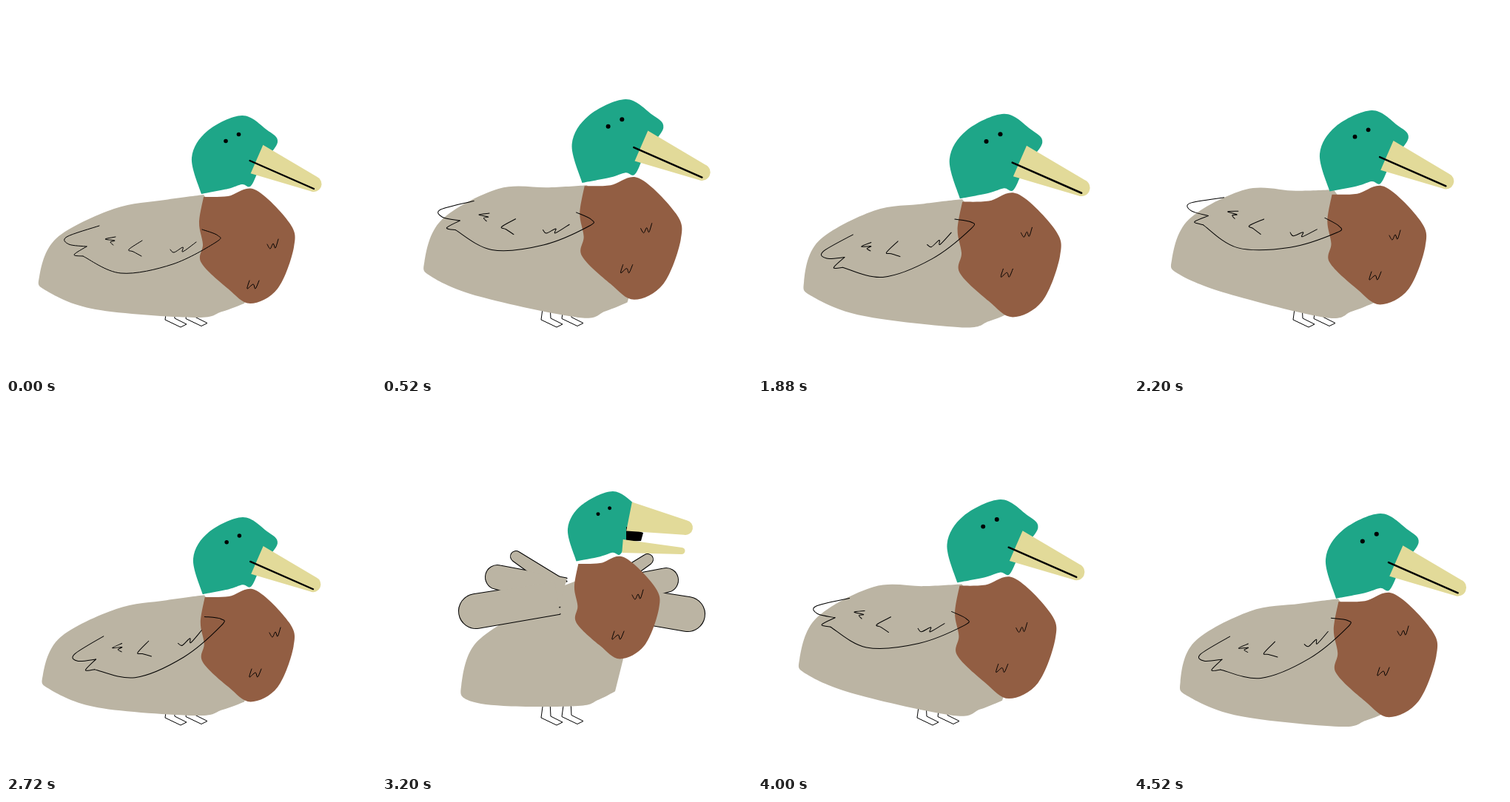
Animation of 500 by 500 pixels, one loop 4.76 s. Source, as an HTML page with a canvas:

```html
<!DOCTYPE html>
<html lang="en">
<head>
<meta charset="utf-8">
<title>Duck</title>
<style>
html, body { margin: 0; width: 100%; height: 100%; overflow: hidden; background: #fff; }
canvas { display: block; width: 500px; height: 500px; }
</style>
</head>
<body>
<canvas id="c" width="500" height="500"></canvas>
<script>
const ctx = document.getElementById('c').getContext('2d');
const LOOP = 4760, STEP = 40;
const GREY = '#bbb4a3', GREEN = '#1ea688', BROWN = '#925e43', YELLOW = '#e2da99';

// Key points of the resting duck; curves run smoothly through them
const BELLY = 421, HIP = 322;
const BODY = [267,255, 215,262, 146,274, 68,314, 45,366, 55,385, 121,410, 255,BELLY, 292,413, HIP,402];
const HEAD = [264,254, 251,205, 272,169, 319,148, 352,167, 367,184, 345,215, 331,243, 319,241, 300,247, 264,254];
const CHEST = [267,258, 300,257, 336,248, 383,293, 389,326, 367,382, 330,402, 300,382, 264,347, 266,322, 261,293, 267,258];
const FOLDED = [
  [126,297, 82,312, 85,322, 109,325],
  [109,325, 92,336, 104,338],
  [104,338, 155,361, 225,349, 284,319, 286,310, 265,302],
  [148,312, 134,315, 147,317, 141,319, 145,323],
  [184,317, 166,329, 172,332, 183,338],
  [222,329, 227,333, 239,326, 239,332, 257,319]
];
const MARKS = [
  [353,322, 357,328, 361,321, 364,327, 368,315],
  [329,371, 326,382, 334,376, 337,382, 342,371]
];

// front: x, y, scale | wing: tip x, y, degrees | marks: dx, dy
// body: hip x, belly y, scale x, scale y, shear, tail drop
const rest = { front: [251, 147, 1], wing: [288, 312, 0], marks: [0, 0], body: [322, 421, 1, 1, 0, 0] };
const raised = { ...rest, wing: [288, 312, 1.6] };
const sit = { front: [259, 147, 1.083], wing: [291, 294, -12.4], marks: [3, -15], body: [344, 436, 1, 1.04, -0.08, -3] };
const loose = { ...sit, marks: [3, -11] };
const lean = { front: [251, 140, 1.033], wing: [279, 300, 9.4], marks: [-8, -12], body: [324, 421, 0.985, 1.04, 0, -21] };
const dip = { front: [253, 152, 0.982], wing: [293, 292, -13], marks: [3, -13], body: [322, 421, 0.983, 0.98, 0, 0] };
const stand = { front: [251, 117, 0.892], wing: [275, 270, 0], marks: [-15, -64], body: [315, 408, 0.75, 1.04, 0, 29] };
const hop = { front: [257, 124, 1.068], wing: [285, 290, 4], marks: [-3, -22], body: [332, 421, 0.99, 1.08, 0, -16] };

const ease = {
  lin: u => u,
  in: u => u * u,
  out: u => u * (2 - u),
  io: u => u * u * (3 - 2 * u)
};

const settle = at => [
  [at + 120, rest, 'lin'], [at + 240, raised, 'in'], [at + 400, lean, 'io'],
  [at + 560, hop, 'out'], [at + 640, loose, 'in'], [at + 1000, sit, 'out']
];
const KEYS = [
  [0, rest, 'lin'], ...settle(0),
  [1840, sit, 'lin'], [2040, hop, 'io'], [2200, lean, 'lin'], [2360, rest, 'out'],
  [2480, rest, 'lin'], [2720, dip, 'io'], [2800, dip, 'lin'], [2920, stand, 'out'],
  [3280, stand, 'lin'], [3520, rest, 'io'], ...settle(3520),
  [LOOP, sit, 'lin']
];

function poseAt(t) {
  const i = KEYS.findIndex(k => k[0] > t);
  const [t0, a] = KEYS[i - 1], [t1, b, e] = KEYS[i];
  const u = ease[e]((t - t0) / (t1 - t0));
  const pose = {};
  for (const part in a) pose[part] = a[part].map((v, k) => v + (b[part][k] - v) * u);
  return pose;
}

const clamp = v => Math.max(0, Math.min(1, v));

function curve(p) {
  const n = p.length / 2;
  const at = i => { i = Math.max(0, Math.min(n - 1, i)); return [p[2 * i], p[2 * i + 1]]; };
  ctx.moveTo(p[0], p[1]);
  for (let i = 0; i < n - 1; i++) {
    const [a, b, c, d] = [at(i - 1), at(i), at(i + 1), at(i + 2)];
    ctx.bezierCurveTo(b[0] + (c[0] - a[0]) / 6, b[1] + (c[1] - a[1]) / 6,
      c[0] - (d[0] - b[0]) / 6, c[1] - (d[1] - b[1]) / 6, c[0], c[1]);
  }
}

function poly(p) {
  for (let i = 0; i < p.length; i += 2) ctx.lineTo(p[i], p[i + 1]);
}

// Flat base of half-width w, running to a round tip of radius r
function taper(x, y, w, tx, ty, r) {
  const a = Math.atan2(ty - y, tx - x), nx = -Math.sin(a) * w, ny = Math.cos(a) * w;
  ctx.moveTo(x - nx, y - ny);
  ctx.arc(tx, ty, r, a - Math.PI / 2, a + Math.PI / 2);
  ctx.lineTo(x + nx, y + ny);
}

function fill(color, path) {
  ctx.beginPath();
  path();
  ctx.fillStyle = color;
  ctx.fill();
}

function ink(path, width = 1) {
  ctx.beginPath();
  path();
  ctx.strokeStyle = '#000';
  ctx.lineWidth = width;
  ctx.stroke();
}

function group(fn) {
  ctx.save();
  fn();
  ctx.restore();
}

function body([x, y, sx, sy, shear, drop]) {
  const move = (px, py) => {
    const tail = ease.io(clamp((260 - px) / 130));
    return [
      x + sx * (px - HIP) + shear * (BELLY - py),
      Math.min(y, y + sy * (py - BELLY) + drop * tail)
    ];
  };
  const p = [];
  for (let i = 0; i < BODY.length; i += 2) p.push(...move(BODY[i], BODY[i + 1]));
  fill(GREY, () => {
    curve(p);
    poly(move(340, 350));
  });
}

function spreadWing(open, angle, dy, mirror) {
  const lobes = [
    () => taper(244, 248, 10, 181, 206, 7),
    () => taper(245, 255, 20, 156, 234, 16),
    () => taper(237, 262, 22, 127, 280, 23)
  ];
  group(() => {
    if (mirror) {
      ctx.translate(540, 4);
      ctx.scale(-1, 1);
    }
    const size = 0.3 + 0.7 * open;
    ctx.translate(245, 262 + dy);
    ctx.rotate(angle);
    ctx.scale(size, size);
    ctx.translate(-245, -262);
    // inking first leaves only the outline of the joined lobes
    lobes.forEach(l => ink(l, 2));
    lobes.forEach(l => fill(GREY, l));
  });
}

function feet(belly) {
  const lift = Math.min(0, (BELLY - belly) / 2);
  for (let i = 0; i < 2; i++) {
    group(() => {
      ctx.translate(28 * i, lift - 1.5 * i);
      ink(() => poly([218, 402, 215, 424, 236, 434, 244, 430, 228, 422, 227, 402]));
    });
  }
}

function placeFront([x, y, s]) {
  ctx.translate(x, y);
  ctx.scale(s, s);
  ctx.translate(-251, -147);
}

function openBeak() {
  // drawn in the standing pose's own coordinates
  const [x, y, s] = stand.front;
  ctx.translate(251, 147);
  ctx.scale(1 / s, 1 / s);
  ctx.translate(-x, -y);
  fill('#000', () => poly([330, 166, 353, 174, 350, 185, 330, 186]));
  fill(YELLOW, () => taper(325, 192, 9, 405, 198.5, 4.5));
  fill(YELLOW, () => taper(334, 152, 20, 410, 167, 10));
}

function front(pose, open) {
  placeFront(pose.front);
  fill(BROWN, () => curve(CHEST));
  fill(GREEN, () => curve(HEAD));
  fill('#000', () => ctx.arc(297, 182.5, 2.8, 0, 7));
  fill('#000', () => ctx.arc(314.5, 173.5, 2.8, 0, 7));
  if (open > 0.4) {
    openBeak();
  } else {
    fill(YELLOW, () => taper(339, 207, 21, 416, 240.5, 10.5));
    ink(() => poly([329.5, 209, 416, 247]), 2.3);
  }
}

function draw(t) {
  const pose = poseAt(t);
  const open = clamp((t - 2800) / 120) * clamp((3400 - t) / 80);
  const flap = 0.2 * Math.sin((t - 3200) / 240 * Math.PI * 2);
  const lift = pose.front[1] - stand.front[1];

  ctx.fillStyle = '#fff';
  ctx.fillRect(0, 0, 500, 500);
  ctx.lineJoin = ctx.lineCap = 'round';

  if (open > 0) spreadWing(open, flap, lift, true);
  feet(pose.body[1]);
  body(pose.body);
  if (open > 0) spreadWing(open, flap, lift, false);
  group(() => front(pose, open));

  group(() => {
    ctx.translate(...pose.marks);
    MARKS.forEach(p => ink(() => curve(p)));
  });

  if (open === 0) {
    const [x, y, deg] = pose.wing;
    group(() => {
      ctx.translate(x, y);
      ctx.rotate(deg * Math.PI / 180);
      ctx.translate(-288, -312);
      FOLDED.forEach(p => ink(() => curve(p)));
    });
  }
}

const start = performance.now();
function tick(now) {
  const t = Math.max(0, now - start) % LOOP;
  draw(Math.floor(t / STEP) * STEP);
  requestAnimationFrame(tick);
}
draw(0);
requestAnimationFrame(tick);
</script>
</body>
</html>
```
